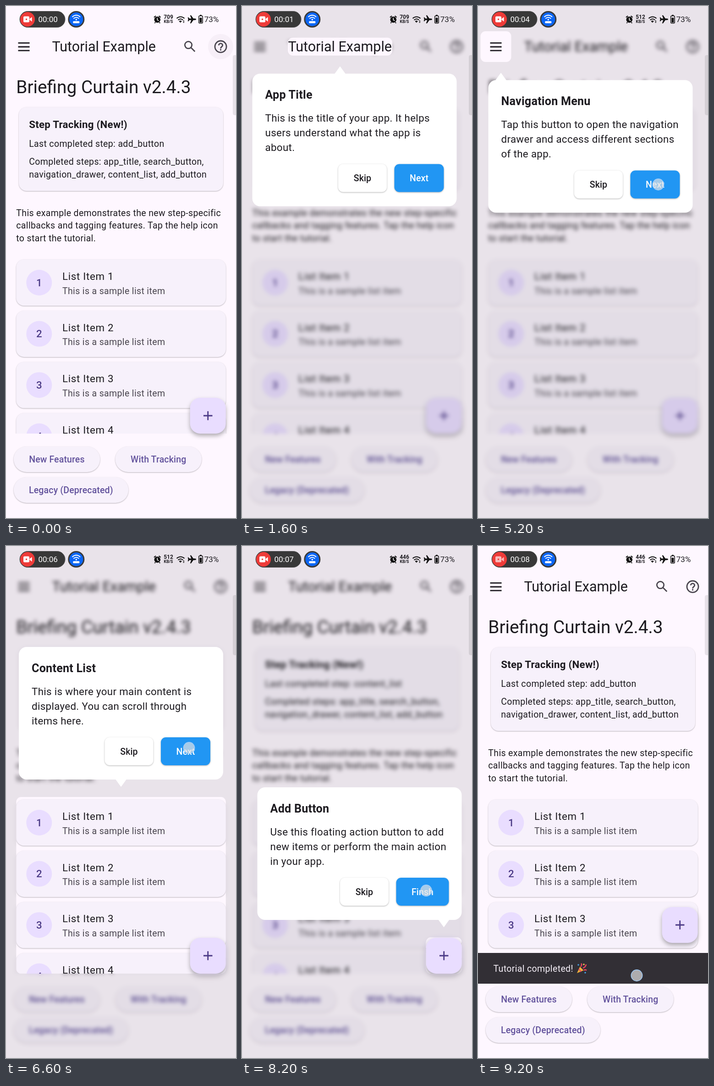
Animation, 502 px wide and 1116 px high, one loop 9.4 s. Source, as an HTML page:

```html
<!DOCTYPE html>
<html lang="en">
<head>
<meta charset="utf-8">
<style>
  html, body { margin: 0; width: 100%; height: 100%; overflow: hidden; background: #fef7ff; }
  svg { display: block; width: 502px; height: 1116px; }
  text { font-family: Roboto, sans-serif; fill: #1d1b20; white-space: pre; }
  .body { font-size: 19.53px; letter-spacing: .35px; }
  .large { font-size: 22.3px; letter-spacing: .7px; }
  .tip { font-size: 22.3px; letter-spacing: .35px; }
  .label { font-size: 19.53px; font-weight: 500; letter-spacing: .14px; }
  .mid { text-anchor: middle; }
  .bold { font-weight: 700; letter-spacing: .25px; }
  .card { fill: #f7f1fb; filter: drop-shadow(0 1.5px 1.2px rgba(0,0,0,.28)); }
  .btn { filter: drop-shadow(0 1.5px 1.5px rgba(0,0,0,.3)); }
  .fab { fill: #e9ddff; filter: drop-shadow(0 5px 5px rgba(0,0,0,.3)); }
  .icon { fill: none; stroke: #49454e; stroke-width: 2; }
</style>
</head>
<body>
<svg id="stage" viewBox="0 0 502 1116"></svg>
<script>
const LOOP = 9400, TICK = 200;
const BG = '#fef7ff', INK = '#1d1b20', PURPLE = '#4b3a86';

// start: when the step opens, hole: x y w h, tip: x y, arrow: tip x, touch: time x y
const steps = [
  { start: 200, hole: [100, 69, 228, 39], tip: [22.5, 147.5], arrow: 214, touch: [2000, 392, 376],
    title: 'App Title', next: 'Next', done: 'add_button',
    lines: ['This is the title of your app. It helps', 'users understand what the app is', 'about.'] },
  { start: 2200, hole: [368, 55, 67, 67], tip: [33.5, 161.5], arrow: 402, touch: [3600, 396, 358],
    title: 'Search Feature', next: 'Next', done: 'app_title',
    lines: ['Use this search button to find content', 'quickly.'] },
  { start: 3800, hole: [5.5, 55, 67, 67], tip: [22.5, 161.5], arrow: 50, touch: [5200, 393.5, 389],
    title: 'Navigation Menu', next: 'Next', done: 'search_button',
    lines: ['Tap this button to open the navigation', 'drawer and access different sections', 'of the app.'] },
  { start: 5400, hole: [22.3, 547, 457.5, 385], tip: [28, 220], arrow: 251, down: true, touch: [6600, 399.5, 440],
    title: 'Content List', next: 'Next', done: 'navigation_drawer',
    lines: ['This is where your main content is', 'displayed. You can scroll through', 'items here.'] },
  { start: 6800, hole: [401.7, 853, 78, 79], tip: [33.5, 526], arrow: 440.5, down: true, touch: [8200, 402, 751],
    title: 'Add Button', next: 'Finsh', done: 'content_list',
    lines: ['Use this floating action button to add', 'new items or perform the main action', 'in your app.'] },
  { start: 8400, touch: [9200, 346.5, 936], done: 'add_button' }
];

const text = (x, y, cls, str, attrs = '') => `<text x="${x}" y="${y}" class="${cls}" ${attrs}>${str}</text>`;
const rect = (x, y, w, h, r, attrs) => `<rect x="${x}" y="${y}" width="${w}" height="${h}" rx="${r}" ${attrs}/>`;
const circle = (x, y, r, attrs) => `<circle cx="${x}" cy="${y}" r="${r}" ${attrs}/>`;
const path = (d, attrs) => `<path d="${d}" ${attrs}/>`;

function listItem(n) {
  const y = 552.5 + (n - 1) * 111.6;
  return rect(22.3, y, 457.5, 100.8, 17, 'class="card"') +
    circle(72.3, y + 50.5, 28, 'fill="#e9ddff"') +
    text(72.3, y + 58.3, 'mid', n, `font-size="22.3" font-weight="500" style="fill:${PURPLE}"`) +
    text(123, y + 44.5, 'large', 'List Item ' + n) +
    text(123, y + 75.3, 'body', 'This is a sample list item', 'style="fill:#49454e"');
}

const pill = (x, y, w, label) => rect(x, y, w, 56, 28, 'class="card"') +
  text(x + w / 2, y + 35.2, 'label mid', label, 'style="fill:#62529c"');

const popper = path('M216 931l6.5-14 8 8z', 'fill="#f3b13a"') +
  path('M224 917q4-4 1-7M229 920q6-2 7-8M231 925q3-3 6 0', 'fill="none" stroke="#e8455f" stroke-width="2.6"') +
  circle(219, 913, 1.7, 'fill="#4aa3e8"') + circle(231, 912, 1.7, 'fill="#f7cf52"') +
  circle(234, 930, 1.7, 'fill="#4aa3e8"') + path('M220 922l5 6', 'stroke="#e8455f" stroke-width="2.4"');

const app = rect(-40, -40, 582, 1196, 0, `fill="${BG}"`) +
  path('M26.5 80.6h25M26.5 89h25M26.5 97.2h25', `stroke="${INK}" stroke-width="2.8"`) +
  text(100.5, 98.5, '', 'Tutorial Example', 'font-size="30.5"') +
  `<g class="icon" transform="translate(384.8 71.8) scale(1.395)">
    <circle cx="9.5" cy="9.5" r="5.5"/><path d="M13.6 13.6l6.1 6.1"/></g>` +
  circle(468.5, 88.5, 27.5, `id="ripple" fill="${INK}" fill-opacity=".03"`) +
  `<g class="icon" transform="translate(451.8 71.8) scale(1.395)">
    <circle cx="12" cy="12" r="9"/><path d="M9 10a3 3 0 1 1 6 0c0 2-3 2.2-3 5M12 16v2"/></g>` +
  text(22.3, 190, '', 'Briefing Curtain v2.4.3', 'font-size="38.8"') +
  rect(28, 220.5, 446, 182.5, 17, 'class="card"') +
  text(50.2, 266, 'bold', 'Step Tracking (New!)', 'font-size="22.3"') +
  text(50.2, 306.5, 'body', '', 'id="last"') +
  text(50.2, 345.8, 'body', 'Completed steps: app_title, search_button,') +
  text(50.2, 373.6, 'body', 'navigation_drawer, content_list, add_button') +
  text(22.3, 457.5, 'body', 'This example demonstrates the new step-specific') +
  text(22.3, 485.4, 'body', 'callbacks and tagging features. Tap the help icon') +
  text(22.3, 513.3, 'body', 'to start the tutorial.') +
  `<g clip-path="url(#listClip)">${[1, 2, 3, 4].map(listItem).join('')}</g>` +
  `<g id="snack">${rect(0, 887, 502, 67, 0, 'fill="#322f35"')}
    ${text(33.5, 927.8, 'body', 'Tutorial completed!', 'style="fill:#f5eff7"')}${popper}</g>` +
  rect(-40, 954, 582, 202, 0, `fill="${BG}"`) +
  pill(16.7, 960, 188.5, 'New Features') + pill(238.5, 960, 188.5, 'With Tracking') +
  pill(16.7, 1027, 250.5, 'Legacy (Deprecated)') +
  `<g id="fab">${rect(401.7, 854, 78, 78, 22, 'class="fab"')}
    ${path('M431 893h19.5M440.75 883.2v19.5', `stroke="${PURPLE}" stroke-width="2.8"`)}</g>`;

const statusBar =
  rect(30, 11.5, 99, 35, 17.5, 'fill="#383838" stroke="#555" stroke-width="1"') +
  circle(47, 29, 16, 'fill="#ee3b38"') +
  `<g id="camera" fill="#fff">${rect(38, 22.5, 13, 13, 2.5, '')}<path d="M51.5 28l5-4v10l-5-4z"/>
    <circle cx="44.5" cy="29" r="1.8" fill="#ee3b38"/></g>` +
  text(70.5, 35, '', '', 'id="clock" font-size="17" style="fill:#fff"') +
  circle(153.3, 29, 16.5, 'fill="#0b66f5" stroke="#3a3a3a" stroke-width="3"') +
  path('M145 23.5q8.3-7 16.6 0M147.8 27q5.5-4.6 11 0', 'fill="none" stroke="#fff" stroke-width="1.8" stroke-linecap="round"') +
  circle(153.3, 29.8, 1.7, 'fill="#fff"') + rect(146.3, 33, 14, 4.5, 1.5, 'fill="#fff"') +
  circle(330.3, 29.8, 6.8, 'fill="#111"') +
  path('M323 24.8l4-3.2M337.6 24.8l-4-3.2M326 35.5l-1.6 2M334.6 35.5l1.6 2', 'stroke="#111" stroke-width="2"') +
  path('M330.3 25.8v4.5l3 1.8', 'fill="none" stroke="#fff" stroke-width="1.5"') +
  text(354.5, 28, 'mid', '', 'id="speed" font-size="12" font-weight="700"') +
  text(354.5, 37.3, 'mid', 'KB/S', 'font-size="8.8" font-weight="700"') +
  path('M372.5 27q8.5-7 17 0M375.5 30.5q5.5-4.5 11 0', 'fill="none" stroke="#111" stroke-width="2"') +
  path('M377.5 33q3.2-2.4 6.4 0l-3.2 3.5zM386 33.5l1.8-2.4 1.8 2.4zM386 34.8l1.8 2.4 1.8-2.4z', 'fill="#111"') +
  path('M415 29q0-1.7-3-1.7h-3l-5-7h-2.2l2.5 7h-4l-2-2.5h-1.6l1 4.2-1 4.2h1.6l2-2.5h4l-2.5 7h2.2l5-7h3q3 0 3-1.7z', 'fill="#111"') +
  rect(420.8, 21.5, 8.4, 16, 2, 'fill="none" stroke="#111" stroke-width="1.5"') +
  rect(423, 19.3, 4, 2, 0, 'fill="#111"') + rect(422.6, 25.5, 4.8, 10.4, .6, 'fill="#111"') +
  text(432.8, 35.2, '', '73%', 'font-size="17"');

function tooltip({ tip: [x, y], title, lines, next, arrow, down }) {
  const buttonY = y + 101 + lines.length * 32, height = 193 + lines.length * 32;
  const nextW = next === 'Next' ? 108 : 115, skipX = x + 418 - nextW - 122.5;
  return rect(x, y, 446, height, 17, 'fill="#fff"') +
    path(down ? `M${arrow - 12} ${y + height - .5}h24l-12 16.5z` : `M${arrow - 12} ${y + .5}h24l-12-16.5z`, 'fill="#fff"') +
    text(x + 28, y + 54.5, 'bold', title, 'font-size="25.1"') +
    lines.map((line, i) => text(x + 28, y + 104.8 + i * 32, 'tip', line)).join('') +
    rect(skipX, buttonY, 106, 61, 11, 'fill="#fff" class="btn"') +
    text(skipX + 53, buttonY + 37.5, 'label mid', 'Skip') +
    rect(x + 418 - nextW, buttonY, nextW, 61, 11, 'fill="#2196f3" class="btn"') +
    text(x + 418 - nextW / 2, buttonY + 37.5, 'label mid', next, 'style="fill:#fff"');
}

const $ = id => document.getElementById(id);
$('stage').innerHTML = `<defs>
    <clipPath id="listClip">${rect(0, 547, 502, 385, 0, '')}</clipPath>
    <clipPath id="holeClip">${rect(0, 0, 0, 0, 11, 'id="hole"')}</clipPath>
    <g id="app">${app}</g>
  </defs>
  <g id="back"><use href="#app"/></g>
  <rect id="dim" width="502" height="1116"/>
  <g id="spot" clip-path="url(#holeClip)"><use href="#app"/></g>
  <g id="tips">${steps.slice(0, 5).map(s => `<g>${tooltip(s)}</g>`).join('')}</g>
  ${path('M502 107h-3q-4 0-4 5v121q0 5 4 5h3z', 'fill="#000" fill-opacity=".09"')}
  ${statusBar}
  ${circle(0, 0, 12.2, 'id="touch" fill="#e1e1e3" fill-opacity=".7" stroke="#9fcdfb" stroke-width="1.4"')}`;

const clamp = v => Math.max(0, Math.min(1, v));
const show = (el, on) => el.style.display = on ? '' : 'none';

function draw(t) {
  const index = steps.findLastIndex(s => s.start <= t);
  const step = steps[Math.max(0, index)];
  const overlay = clamp(t / 400) * clamp((8600 - t) / 400);
  const snack = clamp((t - 8400) / 400);

  $('back').style.filter = overlay ? `blur(${4 * overlay}px)` : 'none';
  $('dim').style.opacity = .082 * overlay;
  show($('spot'), overlay > 0 && step.hole);
  if (step.hole) ['x', 'y', 'width', 'height'].forEach((k, i) => $('hole').setAttribute(k, step.hole[i]));

  [...$('tips').children].forEach((tip, i) => {
    show(tip, i === index);
    tip.style.opacity = clamp((t - step.start + 150) / 350);
  });

  show($('ripple'), t < 200);
  show($('snack'), snack > 0);
  $('snack').setAttribute('transform', `translate(0 ${67 * (1 - snack)})`);
  $('fab').setAttribute('transform', `translate(0 ${-67 * snack})`);

  $('last').textContent = 'Last completed step: ' + step.done;
  $('clock').textContent = '00:0' + Math.max(0, Math.floor((t - 400) / 1000));
  $('speed').textContent = t < 4000 ? 709 : t < 7000 ? 512 : 446;
  $('camera').style.opacity = t >= 9200 ? .65 : 1;

  const hit = steps.find(({ touch: [at] }) => t >= at && t < at + 200);
  show($('touch'), hit);
  if (hit) $('touch').setAttribute('transform', `translate(${hit.touch[1]} ${hit.touch[2]})`);
}

let shown = -1;
function frame() {
  const t = Math.floor(performance.now() % LOOP / TICK) * TICK;
  if (t !== shown) draw(shown = t);
  requestAnimationFrame(frame);
}
frame();
</script>
</body>
</html>
```
